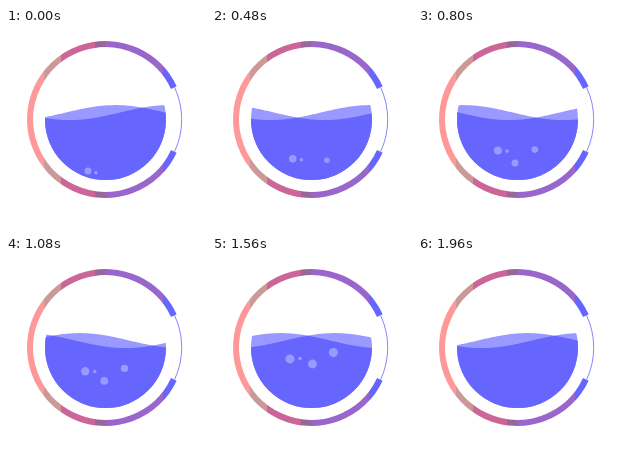
These frames come from a looping animation (200 px wide and 200 px high, 2 s). An HTML page with a canvas:

```html
<!DOCTYPE html>
<html lang="en">
<head>
<meta charset="utf-8">
<title>Liquid gauge</title>
<style>
  html, body { margin: 0; width: 100%; height: 100%; overflow: hidden; background: #fff; }
  canvas { display: block; width: 200px; height: 200px; }
</style>
</head>
<body>
<canvas id="stage" width="200" height="200"></canvas>
<script>
const ctx = document.getElementById('stage').getContext('2d');
const LOOP = 2000, STEP = 40, TAU = Math.PI * 2;
const CENTER = { x: 99.5, y: 91.5 };
const BOWL = 60.5;
const RING = { r: 75.4, width: 6.2, gap: 25 * Math.PI / 180 };
const WAVE = { length: 200, level: 84.6, height: 7.5, period: LOOP - STEP };
const PALE = '#9999ff', DEEP = '#6666ff';

// Position and radius at time 0, their rates per ms, and the visible interval.
const bubbles = [
  { x: 82, vx: -0.0026, y: 143, vy: -0.0257, r: 3.4, vr: 0.0007, from: 0, to: 1880 },
  { x: 90, vx: -0.0012, y: 144.7, vy: -0.027, r: 1.8, vr: 0, from: 0, to: 1880 },
  { x: 93.4, vx: 0.0045, y: 163.2, vy: -0.0354, r: 2.5, vr: 0.00125, from: 560, to: 1920 },
  { x: 112, vx: 0.006, y: 148, vy: -0.033, r: 2, vr: 0.0016, from: 320, to: 1760 }
];

// Right edge and colour of each vertical band of the ring.
const bands = [
  [38, '#ff9999'], [55, '#cc9999'], [89, '#cc6699'],
  [99, '#996699'], [157, '#9966cc'], [200, DEEP]
];
const tint = ctx.createLinearGradient(0, 0, 200, 0);
let left = 0;
for (const [right, color] of bands) {
  tint.addColorStop(left / 200, color);
  tint.addColorStop(right / 200, color);
  left = right;
}

function disc(x, y, r) {
  ctx.beginPath();
  ctx.arc(x, y, r, 0, TAU);
}

function arc(r, width, start, end) {
  ctx.lineWidth = width;
  ctx.beginPath();
  ctx.arc(CENTER.x, CENTER.y, r, start, end);
  ctx.stroke();
}

function drawRing() {
  ctx.strokeStyle = tint;
  arc(RING.r, RING.width, RING.gap, TAU - RING.gap);
  arc(RING.r + 0.8, 0.8, -RING.gap, RING.gap);
}

function wave(crest) {
  const path = new Path2D();
  path.moveTo(36, 160);
  for (let x = 36; x <= 164; x++) {
    path.lineTo(x, WAVE.level - WAVE.height * Math.cos((x - crest) / WAVE.length * TAU));
  }
  path.lineTo(164, 160);
  return path;
}

function drawLiquid(t) {
  const shift = t / WAVE.period * WAVE.length;
  const back = wave(109.5 + shift), front = wave(163.5 + shift);
  ctx.save();
  disc(CENTER.x, CENTER.y, BOWL);
  ctx.clip();

  // Pale where one wave stands alone, deep where both overlap.
  ctx.fillStyle = PALE;
  ctx.fill(back);
  ctx.fill(front);
  ctx.save();
  ctx.clip(back);
  ctx.fillStyle = DEEP;
  ctx.fill(front);
  ctx.restore();

  ctx.fillStyle = PALE;
  for (const b of bubbles) {
    if (t < b.from || t >= b.to) continue;
    disc(b.x + b.vx * t, b.y + b.vy * t, b.r + b.vr * t);
    ctx.fill();
  }
  ctx.restore();
}

const began = performance.now();

function frame() {
  const t = Math.floor((performance.now() - began) % LOOP / STEP) * STEP;
  ctx.fillStyle = '#fff';
  ctx.fillRect(0, 0, 200, 200);
  drawRing();
  drawLiquid(t);
  requestAnimationFrame(frame);
}
frame();
</script>
</body>
</html>
```
